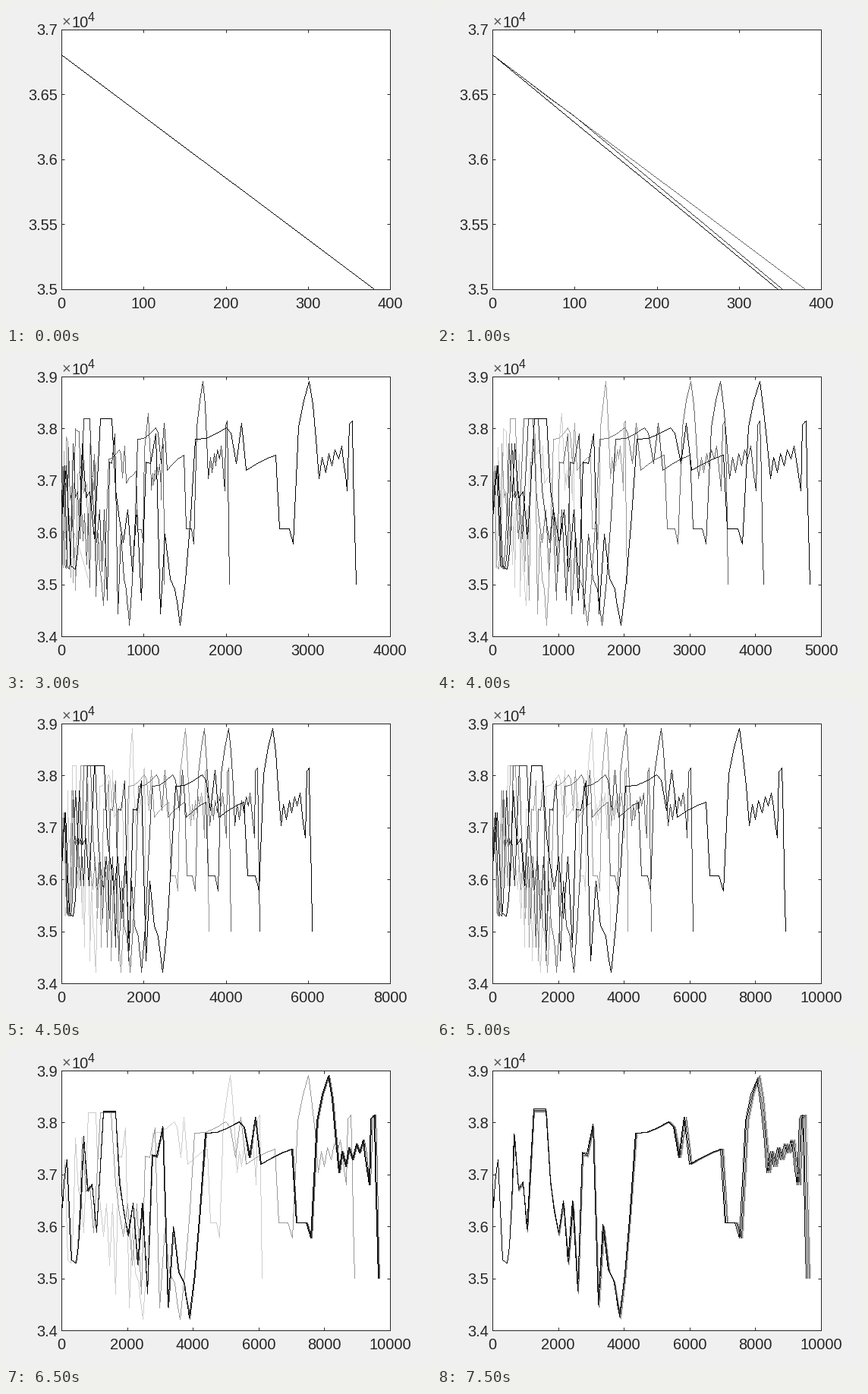
Animation, 560 px wide and 420 px high, one loop 8 s. Source, as a matplotlib script:

```python
import math
import numpy as np
import matplotlib
import matplotlib.pyplot as plt
from matplotlib.animation import FuncAnimation

W, H, DPI = 560, 420, 100
PX = 72 / DPI                  # points per pixel
INK = "#262626"
TRAIL = 5                      # curves kept on screen
LEFT, RIGHT, TOP, BOTTOM = 73, 506, 31, 373

matplotlib.rcParams["font.family"] = "Liberation Sans"


def leg(x0, x1, y0, y1, bend=1.0, n=4):
    """Climb or descend, bent by a power of the way covered."""
    t = np.linspace(0, 1, n)
    return np.array([x0 + (x1 - x0) * t, y0 + (y1 - y0) * t ** bend])


def zigzag(x0, x1, n, odd, even):
    """Alternate between two drifting levels at even spacing."""
    y = np.empty(n)
    y[::2] = np.linspace(*odd, len(y[::2]))
    y[1::2] = np.linspace(*even, len(y[1::2]))
    return np.array([np.linspace(x0, x1, n), y])


# Altitude over distance for the whole trip
PROFILE = np.hstack([
    leg(0, 20, 36800, 36350),
    leg(20, 160, 36350, 37280, bend=0.6),
    leg(300, 440, 35350, 35280),
    leg(440, 665, 35280, 37700, bend=1.8),
    zigzag(665, 1065, 4, (37700, 36780), (36660, 35870)),
    leg(1270, 1640, 38180, 38180),
    leg(1640, 2030, 38180, 35800, bend=0.5),
    zigzag(2030, 2620, 5, (35800, 34690), (36420, 36420)),
    leg(2760, 2910, 37350, 37320),
    zigzag(3085, 3570, 4, (37890, 35960), (34430, 35090)),
    leg(3730, 3905, 34890, 34205),
    leg(3905, 4400, 34205, 37780, bend=1.3),
    leg(4400, 5420, 37780, 38010, bend=2),
    zigzag(5570, 6080, 4, (37900, 38100), (37320, 37190)),
    leg(6080, 7040, 37190, 37480, bend=0.8),
    leg(7170, 7480, 36060, 36060),
    leg(7625, 8150, 35770, 38895, bend=0.3),
    leg(8150, 8470, 38895, 37020, bend=1.3),
    zigzag(8470, 9210, 8, (37020, 37400), (37430, 37660)),
    leg(9210, 9400, 37660, 36790),
    leg(9460, 9560, 38070, 38140),
    leg(9560, 9677, 38140, 35000),
])
FULL = PROFILE[0, -1]


def stretched(length, damp=0.0, lift=0.0):
    """Scale the profile to a length, damping or lifting its heights."""
    x, y = PROFILE
    out = y + damp * np.clip(x / 3000, 0, 1) * (36000 - y)
    out += lift * ((x > 600) & (x < 4000))
    out = np.minimum(out, 38930 - 1.7 * lift)
    out[[0, -1]] = y[[0, -1]]
    return x * length / FULL, out


CURVES = [
    leg(0, 380, 36800, 35000),
    np.hstack([leg(0, 99, 36800, 36331), leg(99, 352, 36331, 35000)]),
    leg(0, 346, 36800, 35000),
    stretched(420, damp=0.375),
    stretched(1250, damp=0.21),
    *(stretched(n) for n in (2041, 3580, 4120, 4822, 6097, 8914, FULL)),
    *(stretched(n, lift=(FULL - n) / 2) for n in (9650, 9625, 9580, 9535)),
]


def nice_ticks(low, high, most):
    """Ticks around a range, at the finest 1-2-5 step with few intervals."""
    steps = (m * 10 ** e for e in range(2, 5) for m in (1, 2, 5))
    step = next(s for s in steps if (high - low) / s <= most)
    return np.arange(math.floor(low / step), math.ceil(high / step) + 1) * step


fig = plt.figure(figsize=(W / DPI, H / DPI), dpi=DPI, facecolor="#f0f0f0")
ax = fig.add_axes([LEFT / W, 1 - BOTTOM / H,
                   (RIGHT - LEFT) / W, (BOTTOM - TOP) / H])
ax.tick_params(direction="in", top=True, right=True, length=4.3 * PX,
               width=PX, color=INK, labelcolor=INK, labelsize=20 * PX)
ax.tick_params(axis="x", pad=10.5 * PX)
ax.tick_params(axis="y", pad=5 * PX)
for spine in ax.spines.values():
    spine.set(linewidth=PX, color=INK)

for s, x, y, size, color in (("×", 74, 27.5, 20, "#555555"),
                             ("10", 86, 27.5, 20, INK),
                             ("4", 108, 20, 16, INK)):
    fig.text(x / W, 1 - y / H, s, size=size * PX, color=color, va="baseline")

# Oldest curve is the lightest, newest is black
trails = [ax.plot([], [], ",", color=str(round(0.2 * age, 1)),
                  antialiased=False, clip_on=False, zorder=4 - 0.1 * age)[0]
          for age in range(TRAIL)]


def pixel_line(x, y):
    """Fill a polyline with one point per pixel, for crisp thin strokes."""
    p = np.rint(ax.transData.transform(np.column_stack([x, y])))
    dots = [np.linspace(a, b, int(abs(b - a).max()) + 1)
            for a, b in zip(p, p[1:])]
    return ax.transData.inverted().transform(np.vstack(dots)).T


def draw(step):
    shown = CURVES[max(0, step - TRAIL + 1):step + 1][::-1]
    xs, ys = np.hstack(shown)
    xt = nice_ticks(0, xs.max(), 5)
    yt = nice_ticks(ys.min(), ys.max(), 7)
    ax.set_xticks(xt, [str(v) for v in xt])
    ax.set_yticks(yt, [f"{v / 1e4:g}" for v in yt])
    ax.set_xlim(xt[0], xt[-1])
    ax.set_ylim(yt[0], yt[-1])
    for trail in trails:
        trail.set_data([], [])
    for trail, curve in zip(trails, shown):
        trail.set_data(*pixel_line(*curve))
    return trails


anim = FuncAnimation(fig, draw, frames=len(CURVES), interval=500,
                     init_func=lambda: draw(0), repeat=True, repeat_delay=0,
                     blit=False)
plt.show()
```
